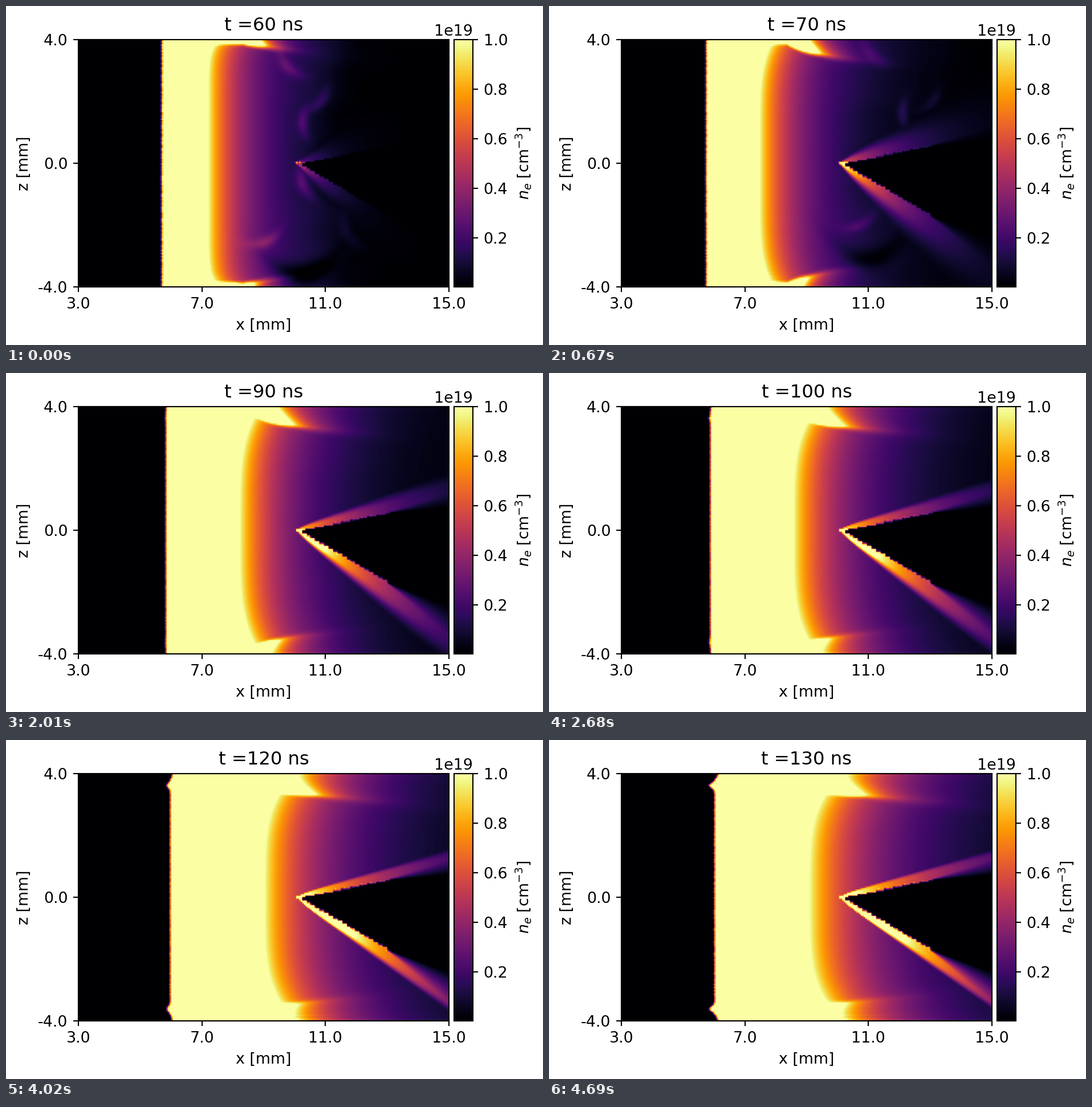
Animation of 942x595 px, one loop 5360 ms. Source, as a matplotlib script:

```python
import numpy as np
import matplotlib.pyplot as plt
from matplotlib.animation import FuncAnimation

W, H, DPI = 942, 595, 192
LEFT, RIGHT, TOP, BOTTOM = 127, 777, 59.3, 492.6
NX, NY = 240, 160
TIP_X, MID_Y = 511, 276
LOW_SLOPE, UP_SLOPE = .5875, .194
BODY = 159  # length of the solid wedge

# Drifting eddies: x, y, speed in x, speed in y, radius, angle, strength
EDDIES = [(520, 205, 700, -120, 26, 90, .13),
          (552, 168, 850, 0, 26, -50, .09),
          (495, 108, 500, -150, 30, 45, .12),
          (520, 312, 630, 370, 30, 70, .14),
          (455, 414, 620, -200, 28, -22, .14),
          (515, 472, 300, -200, 55, 0, -.15),
          (600, 400, 750, 50, 38, 60, .06)]

# The model works in stage pixels, on a grid of square cells.
dx, dy = (RIGHT - LEFT) / NX, (BOTTOM - TOP) / NY
X, Y = np.meshgrid(LEFT + dx * (np.arange(NX) + .5),
                   TOP + dy * (np.arange(NY) + .5))
S = X - TIP_X
BEHIND = np.maximum(S, 0)
FROM_TOP, FROM_LOW = Y - TOP, BOTTOM - Y
WALL = np.minimum(FROM_TOP, FROM_LOW)

rng = np.random.default_rng(4)
EDGE_NOISE = rng.uniform(-.5, .5, (NY, 1))
ROW_NOISE = rng.normal(0, 4, (NY, 1)) * np.exp(-FROM_LOW / 10)


def step(v):
    return .5 + .5 * np.tanh(v)


def front(g):
    """Expanding plasma: flat, then a stretched exponential tail."""
    start = 355 + 102 * np.sin(np.pi * g / 2) ** 1.3
    power = 4 + 8 * (1 - g) ** 12
    shift = (20 + 40 * g) * np.clip(1 - WALL / 216, 0, 1) ** power
    wave = np.cos(2 * np.pi * (Y - 95) / 310) + .3 * np.sin(Y / 11)
    shift = shift + 18 * max(0, 1 - 1.8 * g) * wave * step((X - 520) / 30)
    x = X - shift + ROW_NOISE
    tail = np.maximum(x - start, 0) / (68 + 45 * g ** 1.3)
    return np.exp(-tail ** .86) * step((580 + 800 * g - x) / 30)


def jet(g, d, lag, pull, depth):
    """Streak that leaves a wall; d is the distance from that wall."""
    tip = 455 + 100 * g ** .8 - lag * (1 + g)
    s = np.maximum(X - 415 - 20 * g, 0)
    rise = 1 - np.exp(-s / (45 - 20 * g))
    crest = depth * (1 - .6 * np.exp(-12 * g)) * rise + .08 * s
    u = X + pull * (1 + .5 * g) * np.maximum(crest - d, 0) - tip
    u = u / (.5 + .65 * g)
    amp = np.where(u > 0, np.exp(-(np.maximum(u, 0) / 70) ** .85),
                   np.minimum(1 - u / 60, 2.5))
    sag = np.maximum(d - crest, 0) / (8 + .12 * np.maximum(X - tip, 0))
    return amp * np.exp(-sag ** 1.5)


def eddies(g):
    total = np.zeros_like(X)
    for x, y, vx, vy, r, angle, amp in EDDIES:
        c, s = np.cos(np.radians(angle)), np.sin(np.radians(angle))
        px, py = X - x - vx * g, Y - y - vy * g
        u = px * c + py * s
        v = py * c - px * s + .008 * u * u
        total += amp * np.exp(-(u / r) ** 2 - (v / (.35 * r)) ** 2)
    return total * max(0, 1 - 2.2 * g)


def shock_amp(g, s):
    grown = np.sqrt(g)
    return (.5 + 1.5 * grown) * np.exp(-s / (50 + 120 * grown))


def shock(g, height, inner, outer, gain):
    """Layer along the wedge that sharpens and steadies with time."""
    base = inner * BEHIND
    thick = (outer - inner) * BEHIND + 5 * (1 - np.exp(-BEHIND / 15)) + 2
    part = np.maximum(height - base, 0) / thick
    shape = 1 / (1 + (part / .85) ** (2.5 + 7 * g))
    return gain * shock_amp(g, BEHIND) * shape * (S > -1) * (height > -3)


def dots(field, s, sign, slope, amp):
    for si, a in zip(s, amp):
        y = MID_Y + sign * (slope * si + 1)
        r2 = (S - si) ** 2 + (Y - y) ** 2
        np.maximum(field, a * np.exp(-r2 / 6), out=field)


def wedge_mask():
    """1 outside the wedge, 0 inside: stepped edges, then a soft wake."""
    def edge(slope, size):
        line = slope * S
        return np.where(S < BODY, size * np.floor(line / size), line)

    tail = np.maximum(S - BODY, 0)
    low = (edge(LOW_SLOPE, 4.6) - (Y - MID_Y)) / (1 + .5 * tail)
    up = (edge(UP_SLOPE, 3) - (MID_Y - Y)) / (1 + .25 * tail)
    inside = np.clip(low + .5, 0, 1) * np.clip(up + .5, 0, 1)
    return 1 - inside * (S > 2)


MASK = wedge_mask()


def density(g):
    """Field at progress g, from 0 to 1."""
    streaks = [jet(g, FROM_TOP, 0, 1, 28), jet(g, FROM_LOW, 18, .8, 24)]
    f = sum(part ** 4 for part in [front(g), *streaks]) ** .25
    f = np.clip(f + eddies(g), 0, 1)

    early = 1 - g
    low_out = .72 + .28 * early ** 1.5
    up_out = .3 + .3 * early ** 3
    f = np.maximum(f, shock(g, Y - MID_Y, LOW_SLOPE, low_out, 1))
    f = np.maximum(f, shock(g, MID_Y - Y, UP_SLOPE, up_out, .6))
    f = np.clip(f, 0, 1) * MASK

    s = np.arange(5, BODY + 2, 8)
    dots(f, s, 1, LOW_SLOPE, 1.25 * shock_amp(g, s))
    s = 36 + 15.5 * np.arange(9)
    dots(f, s, -1, UP_SLOPE, .8 * shock_amp(g, s))
    dots(f, [-1, 4], -1, UP_SLOPE, [1, .9])

    bump = 6 * np.exp(-(WALL / 9) ** 2) - 9 * np.exp(-((WALL - 21) / 6) ** 2)
    edge = 273 + 17 * g + EDGE_NOISE + g ** 3 * bump
    return np.clip(f, 0, 1) * np.clip((X - edge) / 4 + .5, 0, 1)


def box(x0, x1):
    return [x0 / W, 1 - BOTTOM / H, (x1 - x0) / W, (BOTTOM - TOP) / H]


TIMES = range(60, 131, 10)
FIELDS = [density((t - 60) / 70) for t in TIMES]

plt.rcParams.update({"font.family": "DejaVu Sans", "font.size": 10.1})
fig = plt.figure(figsize=(W / DPI, H / DPI), dpi=DPI, facecolor="white")
ax = fig.add_axes(box(LEFT, RIGHT))
im = ax.imshow(FIELDS[0], cmap="inferno", vmin=.002, vmax=1, aspect="auto",
               extent=(LEFT, RIGHT, BOTTOM, TOP))
ax.set_xticks(np.linspace(LEFT, RIGHT, 4), ["3.0", "7.0", "11.0", "15.0"])
ax.set_yticks([TOP, (TOP + BOTTOM) / 2, BOTTOM], ["4.0", "0.0", "-4.0"])
ax.set_xlabel("x [mm]")
ax.set_ylabel("z [mm]")
title = ax.set_title("")

cax = fig.add_axes(box(786, 819))
bar = fig.colorbar(im, cax=cax, ticks=[.2, .4, .6, .8, 1])
bar.set_label(r"$n_e$ [cm$^{-3}$]")
fig.text(819 / W, 1 - 51.5 / H, "1e19", ha="right", va="baseline")


def update(i):
    im.set_data(FIELDS[i])
    title.set_text(f"t ={TIMES[i]} ns")
    return im, title


anim = FuncAnimation(fig, update, frames=len(TIMES), interval=670,
                     repeat=True, repeat_delay=0)
plt.show()
```
